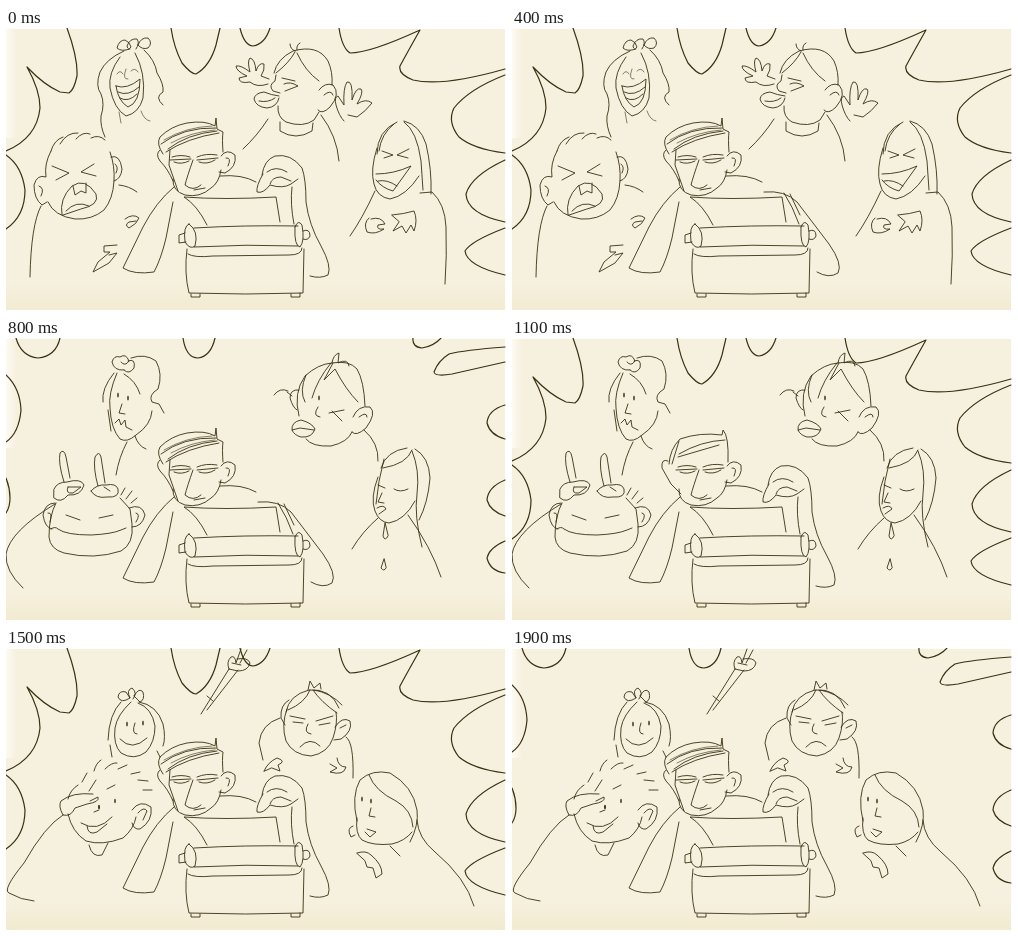
Animation, 500 px wide and 282 px high, one loop 2 s. Source, as an HTML page:

```html
<!DOCTYPE html>
<html lang="en">
<head>
<meta charset="utf-8">
<title>Writer and hecklers</title>
<style>
html, body { margin: 0; width: 100%; height: 100%; overflow: hidden; background: #f6f0df; }
svg { display: block; width: 100vw; height: 100vh; }
.ink { fill: none; stroke: #3a3112; stroke-width: .9; stroke-linecap: round; stroke-linejoin: round; }
.burst { stroke-width: 1.2; }
.fine { stroke-width: .6; }
.dot { fill: #3a3112; stroke: none; }
</style>
</head>
<body>
<svg viewBox="0 0 500 282" preserveAspectRatio="none">
  <defs>
    <linearGradient id="paper" x2="0" y2="1">
      <stop offset="0" stop-color="#f6f0df"/>
      <stop offset=".9" stop-color="#f6f0df"/>
      <stop offset="1" stop-color="#f2ebd1"/>
    </linearGradient>
    <linearGradient id="glare">
      <stop offset="0" stop-color="#fffdf6" stop-opacity=".8"/>
      <stop offset="1" stop-color="#fffdf6" stop-opacity="0"/>
    </linearGradient>
  </defs>
  <rect width="500" height="282" fill="url(#paper)"/>
  <rect width="10" height="110" fill="url(#glare)"/>
  <path d="M0 0H500V282H499V1H0Z" fill="#fffefa"/>

  <g class="ink burst" id="bursts">
    <g>
      <path d="M61 0Q72 30 71 48Q68 62 63 65L54 64Q38 57 21 39Q34 62 34 80Q31 110 0 123"/>
      <path d="M0 127Q16 138 19 162Q19 188 0 201"/>
      <path d="M165 0Q168 20 176 35Q185 46 190 46Q204 38 210 17L214 0M234 0Q238 17 247 18Q259 16 264 0"/>
      <path d="M333 0Q336 20 344 25Q364 25 414 2Q401 25 394 38Q392 46 407 52Q436 59 499 41"/>
      <path d="M499 47Q463 61 448 80Q441 94 453 109Q467 121 499 125"/>
      <path d="M499 132Q465 148 460 166Q461 186 499 194M499 200Q465 213 459 223Q461 238 499 247"/>
    </g>
    <g>
      <path d="M10 0Q15 18 32 20Q50 18 54 0M0 37Q14 50 15 72Q13 95 0 104M0 140Q4 150 4 160Q4 169 0 175"/>
      <path d="M177 0Q180 20 192 20Q205 18 209 0M407 0Q406 9 416 10Q428 8 435 0"/>
      <path d="M499 9Q458 12 443 16Q432 23 428 34Q429 39 446 36L499 24"/>
      <path d="M499 67Q482 72 481 85Q484 97 499 101M499 142Q482 149 481 162Q484 173 499 178M499 203Q483 210 481 220Q484 233 499 235"/>
    </g>
    <g>
      <path d="M54 0Q58 32 50 52Q45 64 28 66Q12 66 0 61M0 70Q18 85 19 105Q18 126 0 136M0 147Q10 160 11 182Q9 200 0 209"/>
      <path d="M164 0Q173 26 183 28Q189 27 191 1M193 0Q199 14 208 15Q218 12 223 0"/>
      <path d="M337 0Q338 20 346 25Q370 25 412 3M420 0Q405 30 409 41Q416 54 442 53Q474 50 493 45Q459 69 453 82Q453 108 499 126"/>
      <path d="M499 150Q474 159 468 172Q468 196 499 208"/>
    </g>
  </g>

  <g class="ink" id="crowds">
    <g>
      <!-- laughing girl -->
      <path d="M124 21Q115 24 111 20Q113 12 119 12Q124 14 125 19Q122 23 121 18Q124 10 131 11Q134 15 130 21M132 17Q135 9 142 10Q147 15 142 20Q136 22 132 17"/>
      <path d="M118 23Q100 31 94 44Q89 58 95 66Q99 76 95 88Q94 98 99 109M114 29Q102 45 104 60Q108 81 120 88Q133 85 137 70Q140 45 129 25"/>
      <path d="M138 22Q149 32 151 45Q158 56 157 64Q148 69 157 77M110 58Q121 62 134 51Q134 75 122 79Q112 73 110 58ZM112 64Q122 69 133 59M114 70Q122 75 131 66"/>
      <path class="fine" d="M111 46Q114 41 117 46M125 43Q129 39 132 44M120 41Q116 52 122 51M113 84L115 95M135 83Q138 92 144 93"/>
      <!-- boy sticking out his tongue -->
      <path d="M268 45Q271 31 287 23Q312 16 322 33Q327 44 326 57M289 24Q283 35 270 45M291 25Q299 43 313 53M289 23Q284 21 284 16M291 22Q290 17 294 15"/>
      <path d="M313 62Q319 54 327 57Q335 66 324 79Q316 87 312 82M318 67Q325 61 327 67M270 47L269 53Q262 57 267 63L274 65M273 68Q265 67 258 64Q249 65 248 71Q250 79 261 80Q271 79 273 70M253 73Q262 75 269 70"/>
      <path d="M272 78Q271 89 280 94Q297 100 308 92L313 84M274 94V103Q290 113 306 103L307 95M278 56Q284 53 292 58L279 63M276 50L289 53"/>
      <path d="M262 56Q251 60 244 54Q233 56 233 50L241 48Q230 43 230 38Q235 37 244 44Q241 33 244 30Q249 31 250 43Q253 34 258 36Q259 42 255 48L263 51"/>
      <path d="M338 93Q333 88 330 77Q328 69 332 68L338 77Q337 60 341 54Q347 52 346 72Q350 59 355 61Q358 64 351 76Q360 70 366 75Q360 83 351 89L342 87M262 91Q251 108 237 121M315 87Q331 108 333 133"/>
      <!-- shouting boy -->
      <path d="M45 123Q48 112 57 109M54 116Q61 104 72 105M70 111Q77 103 84 106M85 110Q93 106 99 112M104 124Q109 138 108 153Q107 171 98 182Q86 192 69 191Q48 188 42 174"/>
      <path d="M45 123Q38 136 40 149Q31 146 28 157Q28 171 36 177L41 174M33 158Q39 160 35 168M105 129Q114 126 116 141Q115 151 108 153M109 136Q113 139 110 145"/>
      <path d="M46 138L63 145L50 152M88 136L75 144L90 148M56 187Q53 171 66 158Q79 149 90 166Q94 177 75 181ZM67 158L69 167L75 163L80 165L80 155M60 183Q70 172 83 178"/>
      <path d="M35 178Q25 197 24 249M113 157Q123 158 131 164M119 191Q127 185 133 190Q131 196 123 200Q118 197 123 194L130 193M111 217L98 218L98 224L104 224L92 234L87 244L103 235L111 225L103 227"/>
      <!-- laughing woman -->
      <path d="M371 126Q371 103 391 94M398 93Q414 97 420 116Q426 142 425 166M398 94Q411 103 415 133L417 162M371 120Q364 142 368 156Q371 169 384 171Q400 168 413 148M388 96Q375 106 373 123"/>
      <path d="M370 146Q388 146 405 138L387 163Q376 160 370 152M372 153Q381 151 391 158M376 123L387 127L378 130M403 121L391 127L402 130"/>
      <path d="M369 163Q356 191 344 208M414 165L426 164Q439 176 440 199Q441 228 439 256M363 190Q357 195 361 204Q369 207 378 201Q370 202 372 197L379 196Q375 188 365 191M386 187Q398 186 408 183Q412 192 408 203L405 197L400 205L396 198L387 203L393 194Z"/>
    </g>
    <g>
      <!-- worried girl -->
      <path d="M118 32Q108 33 106 24Q108 17 114 19Q120 15 123 23Q119 29 115 24M122 23Q130 20 128 30Q123 37 118 32M125 20Q139 15 150 23Q157 36 152 51Q142 57 146 64L153 66L158 75"/>
      <path d="M108 35Q95 51 97 64M102 72L105 93M111 35Q102 56 104 70Q105 91 114 101Q121 105 130 97Q145 87 146 73M118 36Q130 43 134 56M109 85L113 81L115 87L119 82L120 89L126 92M116 66L113 75L119 76"/>
      <path d="M121 104Q113 119 110 137M129 98Q132 108 140 111"/>
      <ellipse class="dot" cx="112" cy="57" rx=".8" ry="2.6"/><ellipse class="dot" cx="122" cy="60" rx=".8" ry="2.6"/>
      <!-- boy making horns -->
      <path d="M58 144Q52 125 54 115Q58 110 60 119L64 140M48 151Q51 144 61 144Q75 140 78 147Q75 158 62 157Q55 166 48 160ZM62 149L75 149L67 155Q59 156 62 149M92 148Q87 130 89 119Q93 112 95 119L99 145M85 153Q91 146 100 147Q110 145 112 151Q114 160 101 159Q90 161 85 153M98 149L104 153"/>
      <path d="M49 165Q39 165 37 177Q39 190 46 191M42 175Q47 174 44 184M123 170Q136 165 139 177Q136 189 126 189M130 175Q135 176 130 184M50 165Q43 178 43 199Q44 211 58 215Q88 222 115 213Q128 206 126 186L124 171L114 160"/>
      <path d="M45 191Q49 188 52 191Q60 197 85 197Q106 196 115 192L120 190M60 177L74 182M107 177L93 180M115 157L119 150M120 161L126 153M125 165L131 160M49 166Q4 193 0 216Q-1 233 17 250"/>
      <!-- sulking boy -->
      <path d="M293 78Q287 55 299 38Q312 26 326 25Q343 22 351 31Q358 43 359 68M326 25Q327 17 333 15L332 25Q342 20 343 28M325 25Q311 42 306 60M327 25L318 42L329 31Q340 52 352 64M300 37Q293 53 299 64"/>
      <path d="M347 79Q352 67 364 69Q371 75 360 90Q350 99 346 94M353 79Q361 73 361 79M293 52Q284 51 284 60Q287 70 291 72M268 57Q274 49 282 53M281 54L286 58M312 69Q306 78 314 79"/>
      <path d="M286 92Q285 84 295 82Q306 85 309 91Q306 100 295 99Q288 97 286 92L294 90L308 92M300 101Q306 109 325 108Q342 104 346 94M323 75L338 72M326 73L336 83M358 92Q373 105 372 123"/>
      <ellipse class="dot" cx="313" cy="60" rx=".8" ry="2.4"/>
      <!-- weary woman -->
      <path d="M375 130Q380 113 401 110M409 111Q423 119 424 140Q422 165 413 182M406 112Q401 126 377 130M406 113Q414 132 411 156Q408 178 416 209M378 121Q372 143 370 166"/>
      <path d="M372 139Q364 160 369 173Q373 184 383 185Q399 182 409 163M372 147L379 150M388 151Q394 155 402 151M376 155L372 164L378 165M371 170Q378 166 380 171L373 176M372 180Q356 194 346 211M402 177Q425 209 435 239"/>
      <path d="M379 185L377 198Q379 204 382 198ZM378 221L375 230Q378 234 380 230Z"/>
    </g>
    <g>
      <!-- smiling girl -->
      <path d="M124 50Q115 56 112 49Q113 42 120 44L124 50Q120 42 126 40Q132 45 127 51M128 48Q133 39 137 44Q139 52 134 54L128 48M115 54Q103 66 102 92M133 54Q151 57 157 76Q160 90 157 98"/>
      <path d="M125 54Q111 67 109 80Q107 97 115 105Q128 113 140 104Q149 94 149 78Q146 60 132 55M129 75Q125 86 131 86M114 91Q126 104 141 90M104 97L106 109M151 103L154 109"/>
      <ellipse class="dot" cx="121" cy="76" rx=".8" ry="2.6"/><ellipse class="dot" cx="137" cy="75" rx=".8" ry="2.6"/>
      <!-- boy thumbing his nose -->
      <path d="M88 123Q90 115 95 112M99 121Q106 114 111 115M112 121L121 117M125 126L134 124M132 132L142 133M137 142L146 142M76 134L81 125M83 143L90 132M101 141L109 137"/>
      <path d="M72 137Q64 142 62 151M87 146Q66 144 55 153Q52 158 57 167Q65 169 69 160L81 156Q94 154 92 149L84 153M62 166Q66 184 80 193Q96 198 117 190Q128 181 130 169"/>
      <path d="M126 162Q134 151 145 159Q147 173 134 181Q128 182 126 175M132 165Q138 158 141 163L137 172M75 175Q91 185 106 169M81 178Q82 188 91 184L101 176M88 164L93 162M83 197Q86 210 96 207L102 195M57 167Q39 178 18 215Q-4 242 3 245Q15 252 28 253"/>
      <ellipse class="dot" cx="93" cy="159" rx="1" ry="2.3"/><ellipse class="dot" cx="109" cy="153" rx=".8" ry="2.3"/>
      <!-- arm reaching in from above -->
      <path d="M195 66L223 21M201 62L232 22M223 21Q220 14 225 9Q229 7 230 15L235 1M234 15L241 2M231 11Q242 9 244 15Q242 23 232 23L223 21M226 15L235 17M201 48L207 53"/>
      <!-- sad boy -->
      <path d="M280 64Q283 47 303 42Q325 40 333 60M302 42L304 33L308 40L314 35L315 41M304 42Q299 55 282 62M307 42Q315 54 331 65M308 42Q325 45 336 57"/>
      <path d="M281 61Q275 77 280 93Q287 107 305 108Q322 105 327 90Q332 75 330 64M329 79Q336 68 344 73Q347 83 335 91L328 92M334 80L340 77M283 52Q274 57 275 70L279 77M284 68L299 71M287 74L297 75M310 73L327 68M313 77L324 75M302 76Q297 85 305 86M294 99Q304 88 314 98"/>
      <path d="M274 70Q255 76 253 95L257 112M340 89Q348 94 347 130M258 123Q262 114 271 110Q281 113 272 117L274 123L266 120ZM331 110Q332 119 340 119Q338 128 324 124L331 120L324 116"/>
      <!-- doubtful woman -->
      <path d="M351 173Q345 148 354 132Q366 121 384 125Q407 138 411 162Q413 177 404 194M363 127Q369 143 390 153Q406 162 407 179M351 170Q349 186 356 192Q367 198 386 196Q399 193 406 184M365 160L363 168L369 169M361 181L370 184L364 189L359 184M347 178Q340 180 345 189L349 187"/>
      <ellipse class="dot" cx="356" cy="151" rx=".8" ry="2.6"/><ellipse class="dot" cx="365" cy="153" rx=".8" ry="2.6"/>
      <path d="M351 205Q360 202 365 207Q376 216 376 226L370 230L367 220L361 219L359 213ZM384 198L394 208M411 172Q412 190 429 204Q460 230 468 258"/>
    </g>
  </g>

  <g class="ink" id="heads">
    <g>
      <path d="M157 126Q150 116 154 109Q165 98 181 95Q199 92 209 98L210 90L211 101L217 104Q216 111 217 124M155 116Q177 99 210 100M162 121Q181 106 211 103M160 124Q181 110 213 105"/>
      <path class="fine" d="M158 112Q180 99 206 98M165 115Q185 104 209 102"/>
      <path d="M154 122Q149 126 154 133Q162 141 167 153M164 122L163 137L172 163"/>
    </g>
    <g>
      <path d="M157 126Q158 111 168 101Q188 94 210 97L211 92Q217 98 216 124M167 103L160 126M167 116Q189 103 213 102M166 119L207 107M156 123Q149 120 150 130L159 146L169 156"/>
    </g>
  </g>

  <g class="ink">
    <!-- writer -->
    <path d="M215 128Q221 120 229 127Q231 139 219 145L213 144M220 130Q226 129 222 138M167 151Q166 163 179 167Q194 170 205 160Q213 155 215 142"/>
    <path d="M166 129Q175 126 184 129M164 132L185 131M168 134Q175 137 183 133M191 129Q200 125 211 127M191 132L212 130M193 134Q201 137 209 132M187 132Q181 149 179 157Q187 164 195 157M188 162L199 160"/>
    <path d="M168 159Q150 174 137 199L117 240Q128 247 148 244Q155 231 160 210L167 174M214 148Q236 146 250 154"/>
    <!-- typewriter -->
    <path d="M201 197Q191 177 178 169Q218 172 270 169L274 194M188 200Q239 197 292 198M188 219Q240 216 292 218M183 196Q177 198 179 214Q184 222 189 218Q193 203 183 196ZM179 205L173 207V215L180 214M289 199Q292 191 296 197Q299 213 294 219Q288 218 289 199M297 203Q304 200 304 208Q302 213 297 211"/>
    <path d="M181 221Q178 245 183 265Q239 267 297 265L298 221M182 226Q188 230 207 228L283 227Q296 227 296 220M185 266V269H194V266M285 266V269H294V265"/>
  </g>

  <g class="ink" id="arms">
    <g>
      <path d="M256 147Q258 132 269 128Q285 125 296 140Q300 151 300 174Q303 197 315 218Q326 238 322 247Q314 251 304 248"/>
      <path d="M257 146Q250 158 251 164Q257 166 264 157Q277 161 285 156L292 151M264 156Q266 149 275 149L285 153M261 144Q270 137 281 144M286 159Q284 176 288 196"/>
    </g>
    <g>
      <path d="M252 164Q273 162 285 174Q298 191 317 216Q331 236 326 245Q317 251 305 244M272 165Q281 179 287 196M278 166L288 187"/>
    </g>
  </g>
</svg>
<script>
const LOOP = 2000, STEP = 100;
const layer = id => [...document.getElementById(id).children];
const bursts = layer('bursts'), crowds = layer('crowds'), heads = layer('heads'), arms = layer('arms');

const show = (poses, index) => poses.forEach((pose, i) => {
  pose.style.display = i === index ? '' : 'none';
});

function draw(ms) {
  const n = Math.floor((ms % LOOP) / STEP);
  // burst drawings are held for three ticks at 25 per second
  show(bursts, Math.floor((n * 2.5 + 1) / 3) % 3);
  show(crowds, Math.floor(n / 7));
  show(arms, n >= 3 && n < 10 ? 1 : 0);
  show(heads, n === 10 || n === 11 ? 1 : 0);
}

const start = performance.now();
function tick() {
  draw(performance.now() - start);
  requestAnimationFrame(tick);
}
draw(0);
requestAnimationFrame(tick);
</script>
</body>
</html>
```
